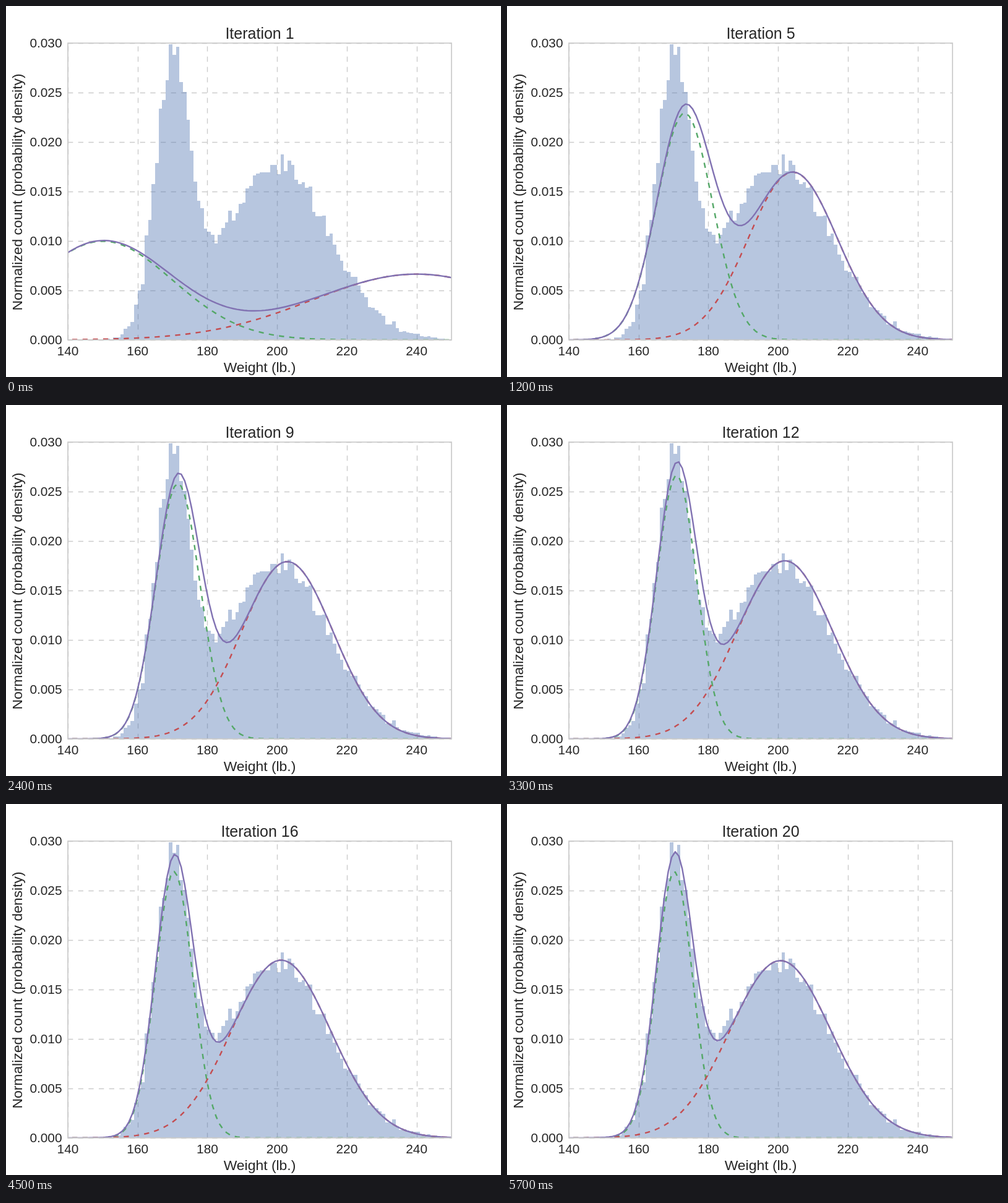
These frames come from a looping animation (800x600 px, 6000 ms). An HTML page:

```html
<!DOCTYPE html>
<html lang="en">
<head>
<meta charset="utf-8">
<title>Mixture fit</title>
<style>
  html, body { margin: 0; width: 100%; height: 100%; overflow: hidden; background: #fff; }
  svg { display: block; width: 800px; height: 600px; }
  text { font-family: "Liberation Sans", Arial, sans-serif; font-size: 20.83px; fill: #262626; text-anchor: middle; }
  .title { font-size: 25px; }
  .label { font-size: 22.92px; }
  .y-tick { text-anchor: end; }
  path { fill: none; }
  #grid { stroke: #ccc; stroke-width: 1.39; stroke-dasharray: 8.33; }
  #bars { fill: #4c72b0; fill-opacity: .4; }
  #curves path { stroke-width: 2.43; stroke-linejoin: round; }
  #curves .part { stroke-dasharray: 8.33; stroke-dashoffset: 6.87; }
  #frame { fill: none; stroke: #ccc; stroke-width: 1.74; }
</style>
</head>
<body>
<svg viewBox="0 0 800 600">
  <clipPath id="plot"><rect x="100" y="60" width="620" height="480"/></clipPath>
  <path id="grid"/>
  <path id="bars"/>
  <g id="curves" clip-path="url(#plot)">
    <path id="low" class="part" stroke="#55a868"/>
    <path id="high" class="part" stroke="#c44e52"/>
    <path id="total" stroke="#8172b2"/>
  </g>
  <rect id="frame" x="100" y="60" width="620" height="480"/>
  <g id="ticks"></g>
  <text id="title" class="title" x="410" y="53"></text>
  <text class="label" x="410" y="592">Weight (lb.)</text>
  <text class="label" transform="translate(26 301) rotate(-90)">Normalized count (probability density)</text>
</svg>
<script>
  const STEP_MS = 300, STEPS = 20, FIRST_BIN = 150;
  // One-pound histogram bins; 16000 units make a density of 1.
  const counts = [
    1, 2, 1, 4, 4, 9, 18, 22, 29, 57,
    80, 90, 169, 194, 252, 286, 374, 388, 420, 478,
    461, 474, 417, 401, 356, 306, 256, 225, 213, 180,
    175, 170, 156, 170, 181, 190, 209, 193, 205, 220,
    222, 245, 249, 266, 269, 271, 271, 271, 283, 283,
    268, 300, 273, 290, 283, 259, 252, 255, 246, 248,
    207, 200, 200, 201, 168, 172, 154, 138, 128, 112,
    110, 102, 102, 88, 76, 69, 53, 52, 48, 43,
    39, 25, 25, 30, 19, 13, 14, 12, 11, 10,
    10, 6, 5, 6, 4, 4, 2, 2, 1, 1
  ];
  const $ = id => document.getElementById(id);
  const px = weight => 100 + (weight - 140) * 620 / 110;
  const py = density => 540 - density * 16000;

  const density = ({ share, mean, sd }, x) =>
    share * Math.exp(-(((x - mean) / sd) ** 2) / 2) / (sd * Math.sqrt(2 * Math.PI));

  // Weighted share, mean and deviation of the histogram.
  function fit(weightAt) {
    let n = 0, sum = 0, squares = 0, all = 0;
    counts.forEach((count, i) => {
      const x = FIRST_BIN + i + 0.5, w = count * weightAt(x);
      all += count;
      n += w;
      sum += w * x;
      squares += w * x * x;
    });
    const mean = sum / n;
    return { share: n / all, mean, sd: Math.sqrt(squares / n - mean * mean) };
  }

  // Expectation-maximisation of two Gaussians.
  function improve([low, high]) {
    const belongs = x => density(low, x) / (density(low, x) + density(high, x));
    return [fit(belongs), fit(x => 1 - belongs(x))];
  }

  function curve(f) {
    const points = [];
    for (let x = 139.5; x <= 251; x++) points.push(px(x).toFixed(2) + ' ' + py(f(x)).toFixed(2));
    return 'M' + points.join('L');
  }

  function drawAxes() {
    let grid = '', ticks = '';
    for (let w = 140; w <= 240; w += 20) {
      grid += `M${Math.round(px(w)) + 0.5} 540V60`;
      ticks += `<text x="${px(w)}" y="565">${w}</text>`;
    }
    for (let i = 0; i <= 6; i++) {
      const y = 540 - i * 80;
      grid += `M100 ${y + 0.5}H720`;
      ticks += `<text class="y-tick" x="90.5" y="${y + 7}">${(i * 0.005).toFixed(3)}</text>`;
    }
    $('grid').setAttribute('d', grid);
    $('ticks').innerHTML = ticks;
    const outline = counts.map((c, i) => `V${540 - c}H${Math.round(px(FIRST_BIN + i + 1))}`);
    $('bars').setAttribute('d', `M${Math.round(px(FIRST_BIN))} 540${outline.join('')}V540Z`);
  }

  const fits = [[{ share: 0.5, mean: 150, sd: 20 }, { share: 0.5, mean: 240, sd: 30 }]];
  while (fits.length < STEPS) fits.push(improve(fits[fits.length - 1]));

  let shown = -1;
  function draw() {
    const step = Math.floor(performance.now() / STEP_MS) % STEPS;
    if (step !== shown) {
      shown = step;
      const [low, high] = fits[step];
      $('low').setAttribute('d', curve(x => density(low, x)));
      $('high').setAttribute('d', curve(x => density(high, x)));
      $('total').setAttribute('d', curve(x => density(low, x) + density(high, x)));
      $('title').textContent = 'Iteration ' + (step + 1);
    }
    requestAnimationFrame(draw);
  }

  drawAxes();
  draw();
</script>
</body>
</html>
```
